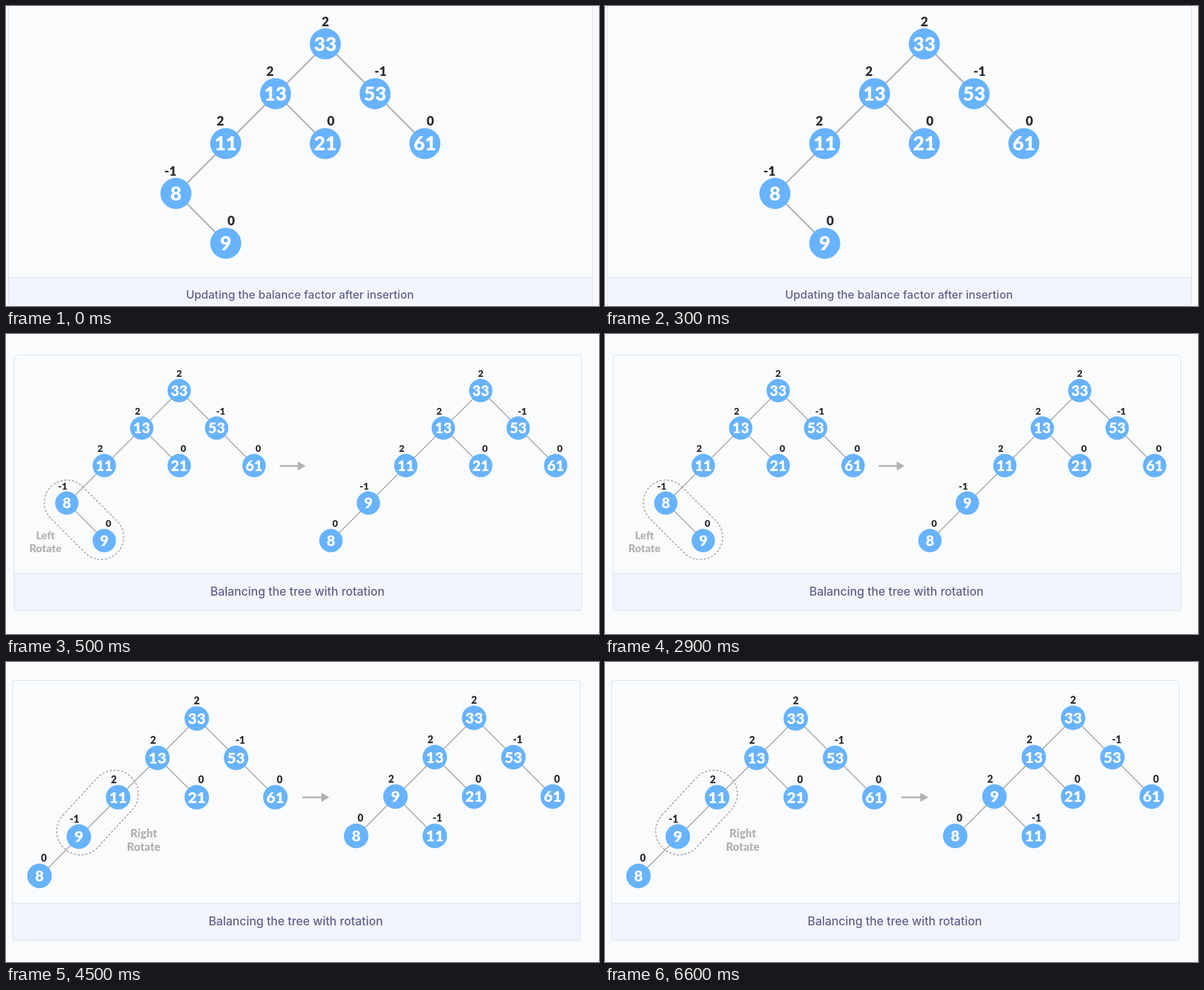
An HTML page for the animation above (8000 ms loop, 1053 px wide and 532 px high).

```html
<!DOCTYPE html>
<html lang="en">
<head>
<meta charset="utf-8">
<title>Tree balancing</title>
<style>
  html, body { margin: 0; width: 100%; height: 100%; overflow: hidden; background: #f9fbfd; }
  svg { display: block; width: 1053px; height: 532px; }
  text { text-anchor: middle; }
  .node { fill: #68b3ff; }
  .value, .factor, .hint { font-family: Lato, "Open Sans", sans-serif; font-weight: 900; }
  .value { fill: #fff; }
  .factor { fill: #2d2e31; }
  .hint { fill: #b4b4b6; }
  .edge, .shaft { stroke: #b1b1b1; }
  .head { fill: #b1b1b1; }
  .loop { fill: none; stroke: #aaa; stroke-width: 2; stroke-dasharray: 3.8 3; }
  .frame { fill: none; stroke: #d5dceb; }
  .footer { fill: #f0f5fe; }
  .caption { font-family: Inter, Roboto, sans-serif; font-weight: 500; fill: #62628d; }
</style>
</head>
<body>
<svg id="stage" viewBox="0 0 1053 532"></svg>
<script>
const stage = document.getElementById('stage');

function add(parent, tag, attrs, text) {
  const el = document.createElementNS('http://www.w3.org/2000/svg', tag);
  for (const key in attrs) el.setAttribute(key, attrs[key]);
  if (text !== undefined) el.textContent = text;
  parent.append(el);
  return el;
}

// [value, balance factor, column, row, parent index, label side]
const top5 = [
  [33, 2, 0, 0, -1, 0],
  [13, 2, -1, 1, 0, -1],
  [53, -1, 1, 1, 0, 1],
  [21, 0, 0, 2, 1, 1],
  [61, 0, 2, 2, 2, 1]
];
const inserted = [...top5, [11, 2, -2, 2, 1, -1], [8, -1, -3, 3, 5, -1], [9, 0, -2, 4, 6, 1]];
const leftTurned = [...top5, [11, 2, -2, 2, 1, -1], [9, -1, -3, 3, 5, -1], [8, 0, -4, 4, 6, 1]];
const rightTurned = [...top5, [9, 2, -2, 2, 1, -1], [8, 0, -3, 3, 5, 1], [11, -1, -1, 3, 5, 0.6]];

function tree(g, nodes, x0, y0, step) {
  const px = n => x0 + n[2] * step;
  const py = n => y0 + n[3] * step;
  const shift = step * 0.015; // edges sit slightly right of the node centres
  for (const n of nodes) {
    const p = nodes[n[4]];
    if (p) add(g, 'line', {
      class: 'edge', x1: px(p) + shift, y1: py(p), x2: px(n) + shift, y2: py(n), 'stroke-width': step * 0.03
    });
  }
  for (const n of nodes) {
    const x = px(n), y = py(n);
    add(g, 'circle', { class: 'node', cx: x, cy: y, r: step * 0.312 });
    add(g, 'text', { class: 'value', x, y: y + step * 0.14, 'font-size': step * 0.39 }, n[0]);
    add(g, 'text', { class: 'factor', x: x + n[5] * step * 0.11, y: y - step * 0.358, 'font-size': step * 0.256 }, n[1]);
  }
}

function card(g, x, y, w, h, split, caption, cx, baseline, size) {
  add(g, 'rect', { class: 'footer', x, y: split, width: w, height: y + h - split, rx: 4 });
  add(g, 'rect', { class: 'frame', x, y, width: w, height: h, rx: 4 });
  add(g, 'line', { class: 'frame', x1: x, x2: x + w, y1: split, y2: split });
  add(g, 'text', { class: 'caption', x: cx, y: baseline, 'font-size': size }, caption);
}

function capsule(g, x1, y1, x2, y2, r) {
  const length = Math.hypot(x2 - x1, y2 - y1);
  const angle = Math.atan2(y2 - y1, x2 - x1) * 180 / Math.PI;
  add(g, 'rect', {
    class: 'loop', x: -r, y: -r, width: length + 2 * r, height: 2 * r, rx: r,
    transform: `translate(${x1} ${y1}) rotate(${angle})`
  });
}

function arrow(g, x1, x2, y) {
  add(g, 'line', { class: 'shaft', x1, y1: y, x2: x2 - 12, y2: y, 'stroke-width': 3 });
  add(g, 'path', { class: 'head', d: `M${x2 - 14} ${y - 8}L${x2} ${y}L${x2 - 14} ${y + 8}Z` });
}

function hint(g, word, x, y, size) {
  add(g, 'text', { class: 'hint', x, y, 'font-size': size }, word);
  add(g, 'text', { class: 'hint', x, y: y + size * 1.21, 'font-size': size }, 'Rotate');
}

function insertion(g) {
  card(g, 4.5, -20, 1037, 600, 481.5, 'Updating the balance factor after insertion', 522, 519, 20);
  tree(g, inserted, 567, 67.2, 88.4);
}

function leftRotation(g) {
  card(g, 14.5, 37.5, 1008, 453, 424.5, 'Balancing the tree with rotation', 517.5, 463.5, 20.8);
  tree(g, inserted, 307.5, 100.3, 66.5);
  tree(g, leftTurned, 843, 100.3, 66.5);
  capsule(g, 108, 299, 169, 360, 40);
  hint(g, 'Left', 70, 364, 19);
  arrow(g, 486, 532, 234);
}

function rightRotation(g) {
  card(g, 11.5, 32.5, 1008, 461, 428, 'Balancing the tree with rotation', 514.5, 466.5, 20.8);
  tree(g, leftTurned, 338.7, 100.2, 69.8);
  tree(g, rightTurned, 831.2, 99, 69.8);
  capsule(g, 132, 300, 193, 234, 42);
  hint(g, 'Right', 244.5, 310.9, 19.8);
  arrow(g, 526, 574, 240);
}

const LOOP = 8000;
const scenes = [[0, insertion], [500, leftRotation], [4500, rightRotation]].map(([from, draw]) => {
  const g = add(stage, 'g', {});
  draw(g);
  return { from, g };
});

function show(time) {
  const current = scenes.filter(s => s.from <= time).pop();
  for (const s of scenes) s.g.style.display = s === current ? '' : 'none';
}

const start = performance.now();
function tick() {
  show((performance.now() - start) % LOOP);
  requestAnimationFrame(tick);
}
tick();
</script>
</body>
</html>
```
